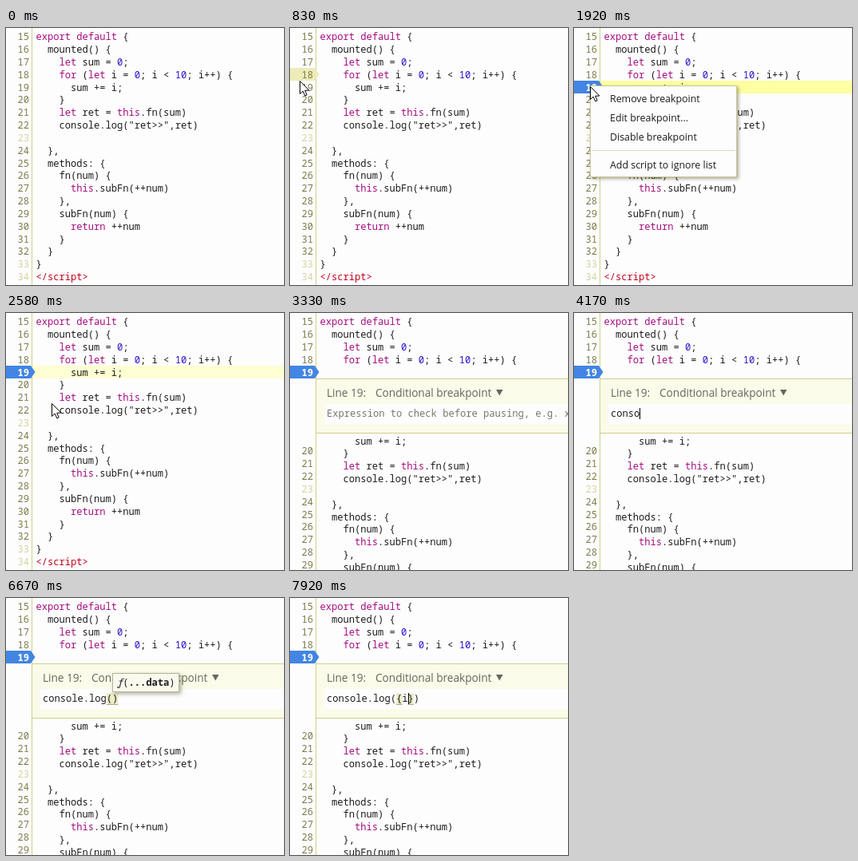
Write an HTML page with a canvas that moves like this. It is 348 by 322 pixels and loops after 8 s.

```html
<!DOCTYPE html>
<html lang="en">
<head>
<meta charset="utf-8">
<title>Conditional breakpoint</title>
<style>
  html, body { margin: 0; width: 100%; height: 100%; overflow: hidden; background: #fdfdfd; }
  canvas { display: block; }
</style>
</head>
<body>
<canvas id="stage" width="348" height="322"></canvas>
<script>
const W = 348, H = 322, LOOP = 8000, TICKS_PER_SECOND = 12;
const ctx = document.getElementById('stage').getContext('2d');

const MONO = '12.1px "Noto Sans Mono", "DejaVu Sans Mono", monospace';
const UI = '"Open Sans", "Noto Sans", sans-serif';
const CHAR = 7.26, ROW = 15.84, TOP = 2.8, FIRST = 15;
const GUTTER = 32, CODE_X = 37.4, INPUT_X = 46, INPUT_BASE = 130;
const INK = '#1c1c1c', RULE = '#cfcf8c', BLUE = '#4285e2', HOVER = '#ececb8';

const source = `export default {
  mounted() {
    let sum = 0;
    for (let i = 0; i < 10; i++) {
      sum += i;
    }
    let ret = this.fn(sum)
    console.log("ret>>",ret)

  },
  methods: {
    fn(num) {
      this.subFn(++num)
    },
    subFn(num) {
      return ++num
    }
  }
}
<\/script>`.split('\n');
const inactive = [23, 33, 34];

// All times below are ticks, 12 to the second.
const TIME = {
  enter: 2, hover: 9, nextRow: 11, mark: 16, menu: 20, menuOff: 31,
  dialog: 32, mouseOff: 35, hint: 69, hintOff: 86
};
const edits = [
  [44, 'c'], [46, 'co'], [47, 'con'], [48, 'cons'], [50, 'conso'],
  [52, 'consol'], [53, 'console'], [55, 'console.'], [57, 'console.l'],
  [59, 'console.lo'], [60, 'console.log'], [67, 'console.log(|)'],
  [82, 'console.log({|})'], [95, 'console.log({i|})']
];
const caretOff = [[40, 44], [74, 82], [94, 95]];
const mousePath = [
  [2, 227, 113], [4, 150, 92], [6, 78, 75], [8, 30, 67], [10, 12, 66],
  [11, 16, 69], [14, 20, 73], [26, 20, 73], [29, 56, 112], [35, 58, 114]
];

const within = (t, from, to) => t >= from && t < to;

function text(str, x, y, color, font = MONO, align = 'left') {
  ctx.font = font;
  ctx.fillStyle = color;
  ctx.textAlign = align;
  ctx.fillText(str, x, y);
}

function rect(x, y, w, h, color) {
  ctx.fillStyle = color;
  ctx.fillRect(x, y, w, h);
}

function polygon(points, fill, stroke) {
  ctx.beginPath();
  points.forEach(([x, y]) => ctx.lineTo(x, y));
  ctx.closePath();
  ctx.fillStyle = fill;
  ctx.fill();
  if (stroke) {
    ctx.strokeStyle = stroke;
    ctx.lineWidth = 1;
    ctx.stroke();
  }
}

function panel(x, y, w, h, fill, border, blur) {
  ctx.save();
  ctx.shadowColor = 'rgba(70,70,20,.45)';
  ctx.shadowBlur = blur;
  ctx.shadowOffsetX = ctx.shadowOffsetY = 2;
  rect(x, y, w, h, border);
  ctx.restore();
  rect(x + 1, y + 1, w - 2, h - 2, fill);
}

function tokenColor(token) {
  if (/^(export|default|let|for|this|return)$/.test(token)) return '#a50d80';
  if (/^\d+$/.test(token)) return '#2a10d0';
  if (token === '<\/script>') return '#c4001e';
  return INK;
}

function codeLine(line, y) {
  for (const m of line.matchAll(/<\/\w+>|\w+|[^\s\w]+/g)) {
    text(m[0], CODE_X + m.index * CHAR, y, tokenColor(m[0]));
  }
}

function marker(number, color) {
  const y = Math.round(TOP + (number - FIRST) * ROW);
  polygon([[0, y], [31, y], [36.5, y + 8], [31, y + 16], [0, y + 16]], color);
}

function editor(t) {
  const open = t >= TIME.dialog;
  rect(0, 0, W, H, '#fdfdfd');
  if (t >= TIME.mark) {
    const fade = Math.max(0, 1 - (t - TIME.mark) / 22);
    rect(GUTTER + 1, 66, W, 16, `rgba(255,255,120,${fade})`);
  }
  rect(GUTTER, 0, 1, H, RULE);
  if (t >= TIME.mark) marker(19, BLUE);
  else if (t >= TIME.nextRow) marker(19, HOVER);
  else if (t >= TIME.hover) marker(18, HOVER);

  source.forEach((line, i) => {
    const number = FIRST + i;
    const base = TOP + i * ROW + 12.4;
    const marked = number === 19 && t >= TIME.mark;
    const color = marked ? '#fff' : inactive.includes(number) ? '#d4d4a4' : '#7c7c4c';
    const font = marked ? 'bold ' + MONO : MONO;
    text(number, 29, Math.round(base + (open && number > 19 ? 83 : 0)), color, font, 'right');
    codeLine(line, Math.round(base + (open && number >= 19 ? 86 : 0)));
  });
}

function dialog(t) {
  const x = GUTTER + 1;
  rect(x, 82, W - x, 69, '#fbfbea');
  rect(x, 82, W - x, 1, RULE);
  rect(x, 150, W - x, 1, RULE);
  rect(43, 114, W - 43, 25, '#fdfdfd');
  const font = '13.6px ' + UI;
  text('Line 19:', INPUT_X, 105, '#66665c', font);
  text('Conditional breakpoint', 107, 105, '#66665c', font);
  polygon([[258, 96], [266.5, 96], [262.2, 103.5]], '#66665c');

  const edit = edits.filter(([at]) => t >= at).pop();
  const value = edit ? edit[1] : '';
  const caret = value.includes('|') ? value.indexOf('|') : value.length;
  const shown = value.replace('|', '');
  const cell = i => INPUT_X + i * CHAR;

  if (value.includes('|')) {
    const opener = Math.max(shown.lastIndexOf('('), shown.lastIndexOf('{'));
    for (const i of [opener, caret]) {
      rect(cell(i), 119, CHAR, 15, '#ecebc8');
      rect(cell(i), 133, CHAR, 1, '#a8a884');
    }
  }
  if (shown) text(shown, INPUT_X, INPUT_BASE, INK);
  else text('Expression to check before pausing, e.g. x > 5', INPUT_X, INPUT_BASE, '#77776c');
  if (!caretOff.some(([a, b]) => within(t, a, b))) {
    rect(Math.round(cell(caret)), 119, 1, 14, '#000');
  }
  if (within(t, TIME.hint, TIME.hintOff)) hint();
}

function hint() {
  panel(133, 94, 84, 24, '#f9f9ee', '#b4b49c', 5);
  text('ƒ', 139, 110, INK, 'italic ' + MONO);
  text('(', 139 + CHAR, 110, INK);
  text('...data', 139 + 2 * CHAR, 110, INK, 'bold ' + MONO);
  text(')', 139 + 9 * CHAR, 110, INK);
}

function menu(t) {
  panel(20, 72, 184, 115, '#fdfdfd', '#c8c89c', 4);
  if (t >= 28) rect(21, 101, 182, 24, '#e9e9e4');
  rect(22, 153, 180, 1, '#d8d8c4');
  const items = [['Remove breakpoint', 93], ['Edit breakpoint...', 117],
    ['Disable breakpoint', 141], ['Add script to ignore list', 176]];
  items.forEach(([label, y]) => text(label, 45, y, INK, '12.4px ' + UI));
}

function mouse(t) {
  const next = mousePath.findIndex(([at]) => at > t);
  const [t0, x0, y0] = mousePath[next - 1];
  const [t1, x1, y1] = mousePath[next];
  const k = (t - t0) / (t1 - t0);
  ctx.save();
  ctx.translate(Math.round(x0 + (x1 - x0) * k) + .5, Math.round(y0 + (y1 - y0) * k) + .5);
  polygon([[0, 0], [0, 16], [3.7, 12.6], [6.3, 18.4], [8.7, 17.3], [6.2, 11.8], [11.3, 11.5]], '#fff', '#000');
  ctx.restore();
}

function draw(ms) {
  const t = Math.floor((ms + 5) * TICKS_PER_SECOND / 1000);
  editor(t);
  if (t >= TIME.dialog) dialog(t);
  if (within(t, TIME.menu, TIME.menuOff)) menu(t);
  if (within(t, TIME.enter, TIME.mouseOff)) mouse(t);
}

const start = performance.now();
function loop() {
  draw((performance.now() - start) % LOOP);
  requestAnimationFrame(loop);
}
loop();
</script>
</body>
</html>
```
